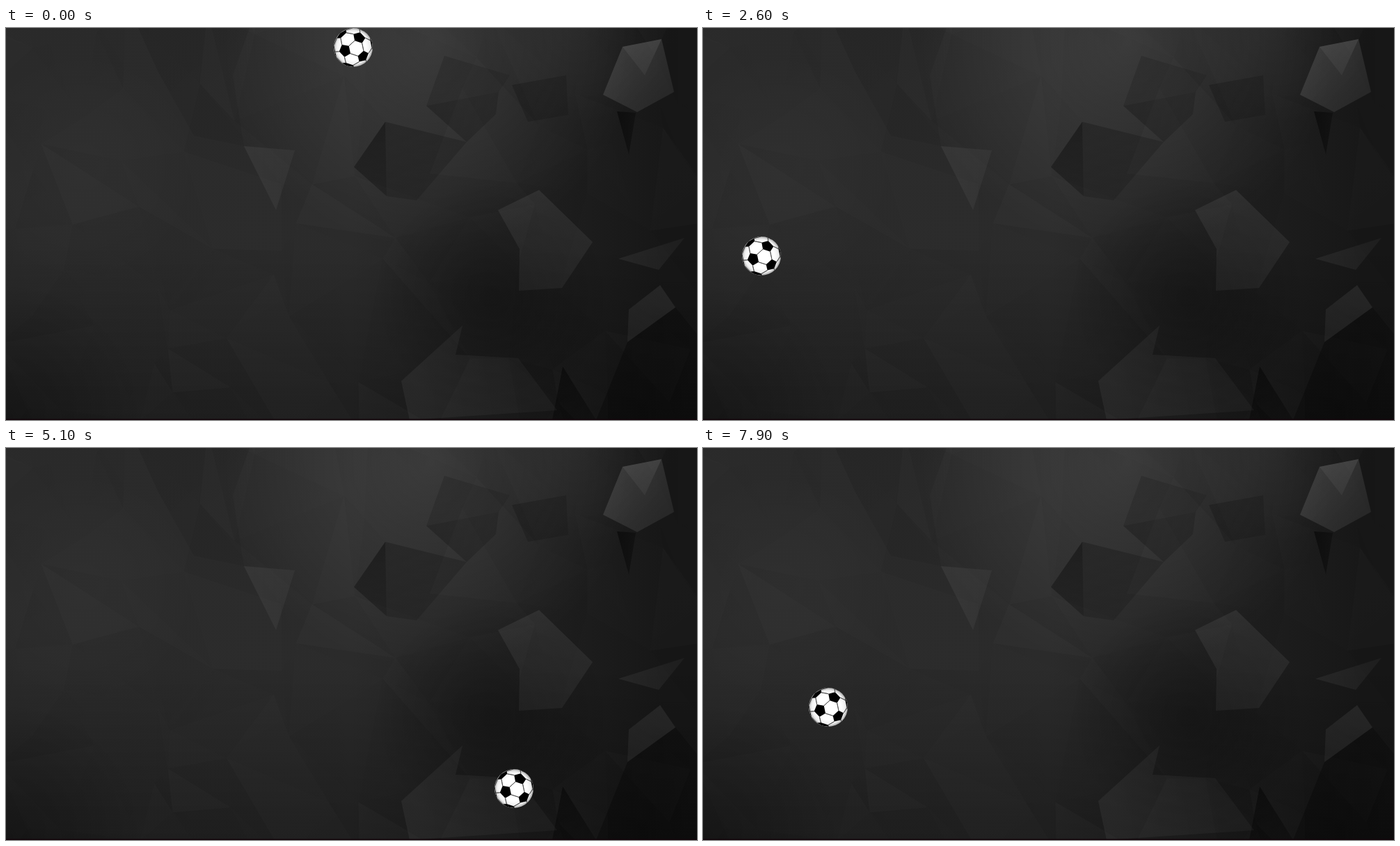
Animation of 993x564 px, one loop 8 s. Source, as an HTML page with a canvas:

```html
<!DOCTYPE html>
<html lang="en">
<head>
<meta charset="utf-8">
<title>Bouncing ball</title>
<style>
  html, body { margin: 0; width: 100%; height: 100%; overflow: hidden; background: #222; }
  canvas { display: block; }
</style>
</head>
<body>
<canvas id="stage" width="993" height="564"></canvas>
<script>
const W = 993, H = 564, STEP = 100, LOOP = 8000, R = 28;
const ctx = document.getElementById('stage').getContext('2d');

function layer(w, h) {
  const c = document.createElement('canvas');
  c.width = w;
  c.height = h;
  return c.getContext('2d');
}

function trace(c, points) {
  c.beginPath();
  for (const [x, y] of points) c.lineTo(x, y);
}

/* Backdrop: soft light and shade, a faint random mesh, and the main facets. */
const bg = layer(W, H);

// Positive amounts lighten, negative ones darken.
const tint = v => v > 0 ? `rgba(255,255,255,${v})` : `rgba(0,0,0,${-v})`;

function fade(gradient, ...stops) {
  for (const [at, color] of stops) gradient.addColorStop(at, color);
  return gradient;
}

function wash(style) {
  bg.fillStyle = style;
  bg.fillRect(0, 0, W, H);
}

function glow(amount, x, y, r) {
  wash(fade(bg.createRadialGradient(x, y, 0, x, y, r),
    [0, tint(amount)], [0.5, tint(amount * 0.5)], [1, tint(amount * 0.001)]));
}

function facet(amount, ...xy) {
  const points = [];
  for (let i = 0; i < xy.length; i += 2) points.push([xy[i], xy[i + 1]]);
  bg.fillStyle = fade(bg.createLinearGradient(...points[0], ...points[points.length >> 1]),
    [0, tint(amount)], [1, tint(amount * 0.6)]);
  trace(bg, points);
  bg.fill();
}

let seed = 7;
function random() {
  seed = seed * 16807 % 2147483647;
  return seed / 2147483647;
}

function mesh(cols, rows) {
  const node = (i, j) => [(i - 0.5 + random()) * W / cols, (j - 0.5 + random()) * H / rows];
  const grid = Array.from({ length: cols + 3 }, (_, i) =>
    Array.from({ length: rows + 3 }, (_, j) => node(i - 1, j - 1)));
  for (let i = 0; i < cols + 2; i++) {
    for (let j = 0; j < rows + 2; j++) {
      const a = grid[i][j], b = grid[i + 1][j], c = grid[i + 1][j + 1], d = grid[i][j + 1];
      facet(0.015 - random() * 0.08, ...a, ...b, ...c);
      facet(0.015 - random() * 0.08, ...a, ...c, ...d);
    }
  }
}

function paintBackdrop() {
  wash(fade(bg.createLinearGradient(0, 0, W, 0), [0, '#2b2b2b'], [0.5, '#2c2c2c'], [0.95, '#171717']));
  wash(fade(bg.createLinearGradient(0, 0, 0, H), [0.55, tint(-0.001)], [1, tint(-0.3)]));
  glow(0.1, 610, 20, 300);
  glow(0.04, 820, 0, 140);
  glow(0.02, 110, 200, 170);
  glow(-0.3, 0, H, 200);
  glow(-0.3, 700, 390, 170);
  mesh(11, 6);

  facet(-0.1, 190, 0, 350, 0, 326, 68, 342, 170, 270, 155, 218, 62);
  facet(0.06, 342, 170, 415, 176, 388, 262);
  facet(-0.4, 545, 135, 547, 242, 500, 200);
  facet(-0.22, 545, 135, 662, 164, 590, 248, 547, 242);
  facet(-0.24, 604, 112, 708, 92, 704, 124, 662, 164);
  facet(-0.15, 630, 40, 724, 68, 708, 92, 604, 112);
  facet(-0.2, 727, 82, 805, 68, 808, 125, 750, 135);
  facet(0.12, 886, 27, 942, 16, 960, 92, 907, 121, 858, 96);
  facet(0.07, 942, 16, 918, 68, 886, 27);
  facet(-0.5, 878, 120, 905, 122, 895, 182);
  facet(0.07, 766, 233, 843, 308, 799, 374, 737, 378, 738, 318, 707, 262);
  facet(0.06, 880, 332, 975, 302, 938, 348);
  facet(0.07, 940, 370, 962, 402, 893, 452, 895, 405);
  facet(-0.3, 893, 452, 962, 402, W, 440, W, H, 848, H);
  facet(-0.45, 800, 487, 848, H, 785, H);
  facet(0.05, 568, 508, 656, 428, 646, 470, 736, 475, 792, 550, 580, H);

  bg.fillStyle = '#12050a';
  bg.fillRect(0, 562.5, W, 1.5);
}

/* Ball: a truncated icosahedron, placed by two neighbouring black patches. */
const dot = (a, b) => a[0] * b[0] + a[1] * b[1] + a[2] * b[2];
const cross = (a, b) => [a[1] * b[2] - a[2] * b[1], a[2] * b[0] - a[0] * b[2], a[0] * b[1] - a[1] * b[0]];
const mix = (a, p, b, q) => a.map((v, i) => v * p + b[i] * q);
const unit = a => a.map(v => v / Math.hypot(...a));

function patchCenters() {
  const pole = unit([0.32, -0.54, 0.78]), next = [-0.46, 0.18, 0.87];
  const u = unit(mix(next, 1, pole, -dot(next, pole))), v = cross(pole, u);
  const half = [pole];
  for (let k = 0; k < 5; k++) {
    const turn = k * Math.PI * 0.4;
    half.push(unit(mix(pole, 1, mix(u, Math.cos(turn), v, Math.sin(turn)), 2)));
  }
  return half.concat(half.map(p => p.map(c => -c)));
}

// Points behind the ball are moved out to its rim.
function project([x, y, z]) {
  const r = z < 0 ? R / Math.hypot(x, y) : R;
  return [x * r, y * r];
}

function paintBall(c) {
  c.translate(R + 1, R + 1);
  c.beginPath();
  c.arc(0, 0, R, 0, 7);
  c.fillStyle = fade(c.createRadialGradient(0, 0, 18, 0, 0, R), [0, '#fff'], [0.6, '#f0f0f0'], [1, '#aaa']);
  c.fill();
  c.clip();
  c.fillStyle = '#000';
  c.strokeStyle = '#444';
  c.lineWidth = 0.8;
  const centers = patchCenters();
  for (const a of centers) {
    const near = centers.filter(b => Math.abs(dot(a, b) - 0.447) < 0.01);
    const corner = b => unit(mix(a, 2, b, 1));
    for (const b of near) {
      const from = corner(b), to = unit(mix(a, 1, b, 2));
      if (from[2] + to[2] < 0) continue;
      trace(c, [project(from), project(to)]);
      c.stroke();
    }
    if (a[2] < -0.3) continue;
    const [cx, cy] = project(a);
    const angle = ([x, y]) => Math.atan2(y - cy, x - cx);
    trace(c, near.map(b => project(corner(b))).sort((p, q) => angle(p) - angle(q)));
    c.fill();
  }
}

/* Motion: straight legs between bounces, given as step, x, y. */
const TOP = R, BOTTOM = H - R;
const bounces = [
  [0, 499, TOP], [9, 499, BOTTOM], [18, 291.5, TOP], [24, R, 224], [30, 194.5, BOTTOM],
  [41, 526, TOP], [52, 750, BOTTOM], [58, W - R, 299], [64, 687, TOP], [75, 333, BOTTOM],
  [79, 180, 373]
];

function ballAt(step) {
  const i = Math.max(1, bounces.findIndex(b => b[0] >= step));
  const a = bounces[i - 1], b = bounces[i];
  const k = (step - a[0]) / (b[0] - a[0]);
  return [a[1] + (b[1] - a[1]) * k, a[2] + (b[2] - a[2]) * k];
}

const ball = layer(2 * R + 2, 2 * R + 2);
paintBackdrop();
paintBall(ball);

function render(now) {
  const [x, y] = ballAt(Math.floor(now % LOOP / STEP));
  ctx.drawImage(bg.canvas, 0, 0);
  ctx.drawImage(ball.canvas, Math.round(x) - R - 1, Math.round(y) - R - 1);
  requestAnimationFrame(render);
}
render(performance.now());
</script>
</body>
</html>
```
